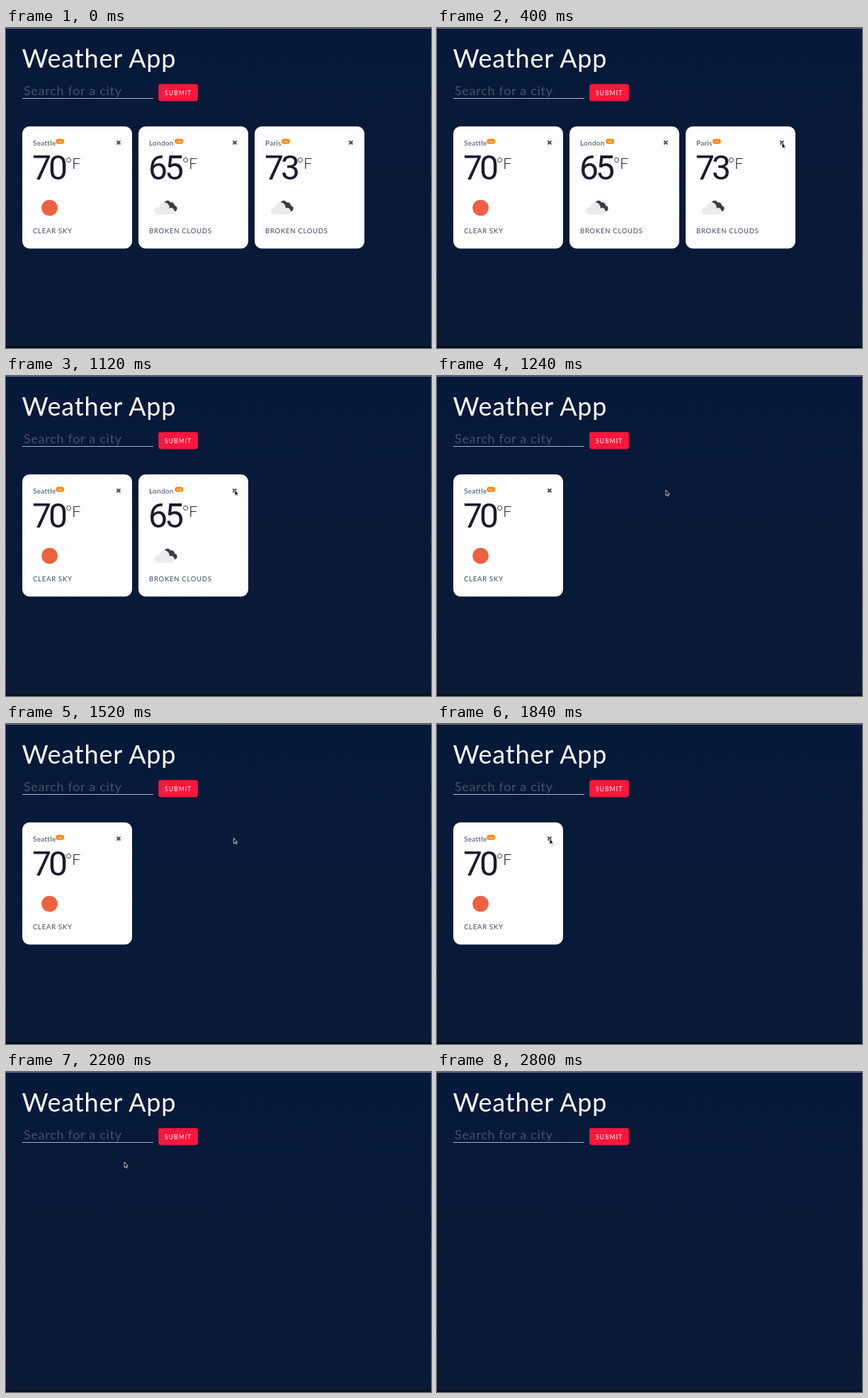
These frames come from a looping animation (600 by 452 pixels, 2.84 s). An HTML page:

```html
<!DOCTYPE html>
<html lang="en">
<head>
<meta charset="utf-8">
<title>Weather App</title>
<style>
  html, body { margin: 0; width: 100%; height: 100%; overflow: hidden; background: #081a3a; }
  svg { display: block; width: 100vw; height: 100vh; }
  text { font-family: Lato, sans-serif; white-space: pre; }
  .title { font-size: 36px; letter-spacing: .8px; fill: #fff; }
  .hint { font-size: 18px; letter-spacing: .7px; fill: #46506c; }
  .button { font-size: 8.5px; letter-spacing: 1.1px; fill: #fff; }
  .city { font-size: 10px; letter-spacing: .3px; fill: #3a4765; }
  .country { font-size: 4.5px; text-anchor: middle; fill: #fff; }
  .degrees { font: 48px Roboto, sans-serif; letter-spacing: -4px; fill: #1a1b2e; }
  .unit { font-size: 22px; font-weight: 300; fill: #1a1b2e; }
  .sky { font-size: 9.5px; letter-spacing: .75px; fill: #3a4765; }
</style>
</head>
<body>
<svg viewBox="0 0 600 452">
  <defs>
    <linearGradient id="night" x2="0" y2="1">
      <stop stop-color="#07193a"/>
      <stop offset="1" stop-color="#0a1a37"/>
    </linearGradient>
    <g id="sun"><circle cx="38.5" cy="115" r="11.3" fill="#ec6140"/></g>
    <g id="clouds">
      <g fill="#3e3d42">
        <circle cx="41" cy="109.5" r="4.7"/>
        <circle cx="46.5" cy="112" r="4.7"/>
        <circle cx="50.5" cy="116" r="4"/>
        <path d="M39 110H49V120H41Z"/>
      </g>
      <g fill="#ebeaed">
        <circle cx="28" cy="119.3" r="5.2"/>
        <circle cx="36.5" cy="114.5" r="7.2"/>
        <circle cx="46" cy="119.8" r="4.7"/>
        <path d="M28 116H46V124.5H28Z"/>
      </g>
    </g>
  </defs>
  <rect width="600" height="452" fill="url(#night)"/>
  <rect width="600" height="1" fill="#68728a"/>
  <rect y="449" width="600" height="3" fill="#050d20"/>
  <text class="title" x="22.5" y="55.5">Weather App</text>
  <text class="hint" x="25" y="94.5">Search for a city</text>
  <rect x="23" y="99" width="185" height="1" fill="#a9b0bf"/>
  <rect x="215.5" y="79.5" width="55" height="23.5" rx="2.5" fill="#fa173c" stroke="#c8183c"/>
  <text class="button" x="224" y="94.5">SUBMIT</text>
  <g id="cards"></g>
  <path id="cursor" d="M0 0V8L1.9 6.3L3 8.8L4.2 8.3L3.1 5.9H5.4Z" fill="#0a0a12" stroke="#e4e6ec" stroke-width=".8"/>
</svg>
<script>
const LOOP = 2840, STEP = 40;

const cards = [
  { x: 23, city: 'Seattle', country: 'US', badge: 47.3, degrees: 70, unit: 61, icon: 'sun', sky: 'CLEAR SKY', gone: 2000 },
  { x: 187, city: 'London', country: 'GB', badge: 51.3, degrees: 65, unit: 62, icon: 'clouds', sky: 'BROKEN CLOUDS', gone: 1200 },
  { x: 351, city: 'Paris', country: 'FR', badge: 38, degrees: 73, unit: 60, icon: 'clouds', sky: 'BROKEN CLOUDS', gone: 640 }
];

// Pointer stops: time, x, y
const stops = [
  [80, 596, 310], [360, 487, 162], [760, 487, 163], [1080, 323, 161],
  [1500, 323, 161], [1840, 159, 162], [2040, 159, 162], [2160, 167, 127],
  [2280, 167, 127], [2560, 338, 154]
];

const cardList = document.getElementById('cards');
const cursor = document.getElementById('cursor');

cardList.innerHTML = cards.map(c => `
  <g transform="translate(${c.x} 139)">
    <rect width="155" height="172.5" rx="10" fill="#fefdff"/>
    <text class="city" x="15" y="26.5">${c.city}</text>
    <rect x="${c.badge}" y="17.5" width="11.8" height="7.2" rx="3.6" fill="#f7890f"/>
    <text class="country" x="${c.badge + 5.9}" y="22.7">${c.country}</text>
    <path d="M133.4 20.4l5 5m0-5l-5 5" stroke="#3a4765" stroke-width="2"/>
    <text class="degrees" x="14" y="74.5">${c.degrees}</text>
    <text class="unit" x="${c.unit}" y="60">°F</text>
    <use href="#${c.icon}"/>
    <text class="sky" x="15" y="151">${c.sky}</text>
  </g>`).join('');

const ease = p => p * p * (3 - 2 * p);

function pointerAt(t) {
  const i = stops.findIndex(s => s[0] > t);
  if (i < 1) return null;
  const [t0, x0, y0] = stops[i - 1], [t1, x1, y1] = stops[i];
  const p = ease((t - t0) / (t1 - t0));
  return [x0 + (x1 - x0) * p, y0 + (y1 - y0) * p];
}

function draw(now) {
  const t = Math.floor(now % LOOP / STEP) * STEP;
  cards.forEach((c, i) => {
    cardList.children[i].style.display = t < c.gone ? '' : 'none';
  });
  const spot = pointerAt(t);
  cursor.style.display = spot ? '' : 'none';
  if (spot) cursor.setAttribute('transform', `translate(${spot})`);
}

const start = performance.now();
(function tick() {
  draw(performance.now() - start);
  requestAnimationFrame(tick);
})();
</script>
</body>
</html>
```
